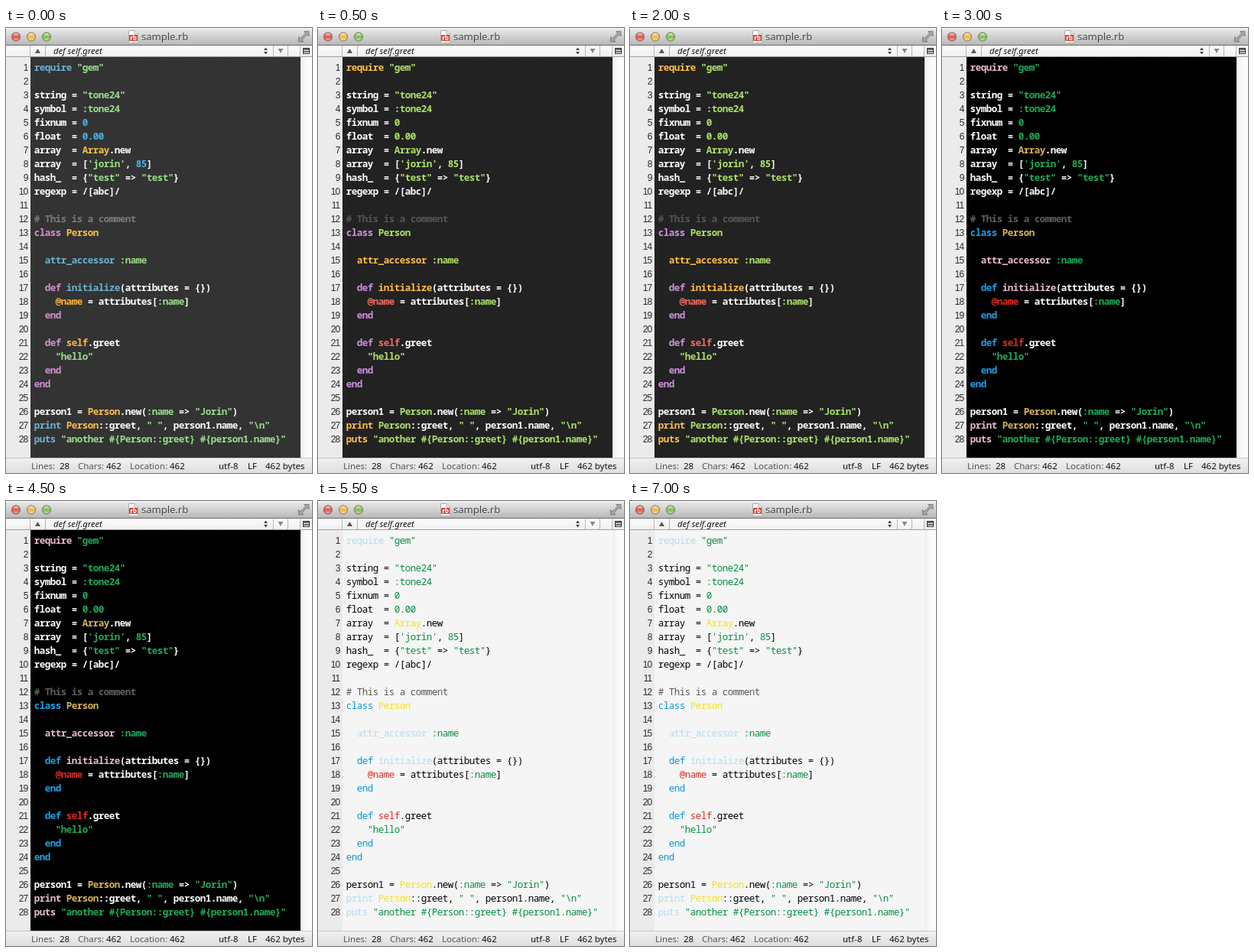
Recreate the animation shown at these times as an HTML page. Size 400x582 px, loop 8 s.

```html
<!DOCTYPE html>
<html lang="en">
<head>
<meta charset="utf-8">
<title>Editor themes</title>
<style>
  html, body { margin: 0; width: 100%; height: 100%; overflow: hidden; background: #fff; }
  svg { display: block; width: 100vw; height: 100vh; }
  text { white-space: pre; }
  .ui { font-family: "Noto Sans", "Open Sans", sans-serif; }
  .nums { font: 12px "Liberation Sans", Arial, sans-serif; letter-spacing: -.8px; fill: #2a2a2a; text-anchor: end; }
  #code { font-family: "Noto Sans Mono", "DejaVu Sans Mono", monospace; font-size: 12.5px; letter-spacing: -.5px; }
  .status { font-size: 11.5px; font-weight: 500; fill: #111; }
  .status .label { fill: #555; }
</style>
</head>
<body>
<svg viewBox="0 0 400 582" xmlns="http://www.w3.org/2000/svg">
  <defs>
    <linearGradient id="title" x2="0" y2="1"><stop stop-color="#ebebeb"/><stop offset="1" stop-color="#b6b6b6"/></linearGradient>
    <linearGradient id="nav" x2="0" y2="1"><stop stop-color="#fdfdfd"/><stop offset="1" stop-color="#eeeeee"/></linearGradient>
    <linearGradient id="foot" x2="0" y2="1"><stop stop-color="#f2f2f2"/><stop offset="1" stop-color="#dedede"/></linearGradient>
    <linearGradient id="track"><stop stop-color="#ededed"/><stop offset=".5" stop-color="#fafafa"/></linearGradient>
    <linearGradient id="gloss" x2="0" y2="1"><stop stop-color="#fff" stop-opacity=".75"/><stop offset=".5" stop-color="#fff" stop-opacity="0"/><stop offset="1" stop-color="#fff" stop-opacity=".5"/></linearGradient>
  </defs>

  <path d="M0 23V4Q0 0 4 0H396Q400 0 400 4V23Z" fill="url(#title)"/>
  <path d="M4 .5H396" stroke="#f8f8f8"/>
  <g id="lights"></g>
  <g>
    <path d="M160.500 3.500H168L172.500 8V19.500H160.500Z" fill="#fff" stroke="#aaa"/>
    <path d="M168 3.500V8H172.500" fill="#eee" stroke="#aaa"/>
    <rect x="161" y="9" width="11" height="8" rx="1" fill="#d9463c"/>
    <text class="ui" x="166.500" y="16" text-anchor="middle" font-size="8" font-weight="700" fill="#fff">rb</text>
  </g>
  <text class="ui" x="177" y="17" font-size="13" fill="#fff" opacity=".6">sample.rb</text>
  <text class="ui" x="177" y="16" font-size="13" fill="#444">sample.rb</text>
  <g fill="#a5a5a5" stroke="#6e6e6e" stroke-width=".8">
    <path d="M389.500 4.500H396V11L393.800 8.800L390.800 11.800L388.700 9.700L391.700 6.700Z"/>
    <path d="M389 18H382.500V11.500L384.700 13.700L387.700 10.700L389.800 12.800L386.800 15.800Z"/>
  </g>

  <rect y="23" width="400" height="15" fill="url(#nav)"/>
  <path d="M0 22.500H400" stroke="#6b6b6b"/>
  <path d="M0 37.500H400" stroke="#a0a0a0"/>
  <path d="M31.500 23V37M51.500 23V37M349.500 23V37M368.500 23V37M384.500 23V37" stroke="#b5b5b5"/>
  <path d="M38 33L41.500 27L45 33Z" fill="#555"/>
  <path d="M355.500 27H362.500L359 33Z" fill="#8a8a8a"/>
  <path d="M337 29L339.500 25.500L342 29ZM337 31L339.500 34.500L342 31Z" fill="#444"/>
  <text class="ui" x="62" y="34" font-size="11.200" font-weight="500" font-style="italic" fill="#111">def self.greet</text>
  <rect x="388.500" y="26.500" width="8" height="7" fill="#fff" stroke="#333"/>
  <path d="M389 28H396M389 31H396" stroke="#333" stroke-width="1.500"/>

  <rect y="38" width="32" height="524" fill="#ebebeb"/>
  <rect id="page" x="32" y="38" width="353" height="524"/>
  <rect x="385" y="38" width="15" height="524" fill="url(#track)"/>
  <g id="nums" class="nums"></g>
  <g id="code"></g>

  <rect y="562" width="400" height="20" fill="url(#foot)"/>
  <path d="M0 562.500H400" stroke="#c4c4c4"/>
  <g id="status" class="ui status"></g>
</svg>

<script>
const NS = "http://www.w3.org/2000/svg";
const $ = id => document.getElementById(id);
const LOOP = 8000, CHAR = 7, LEFT = 36.8, FIRST = 55.5, PITCH = 18;

function add(parent, tag, attrs, text) {
  const el = document.createElementNS(NS, tag);
  for (const key in attrs) el.setAttribute(key, attrs[key]);
  if (text !== undefined) el.textContent = text;
  parent.appendChild(el);
  return el;
}

const themes = [
  { from: 0, page: "#333333", weight: 600, text: "#ffffff", func: "#6ab4d4", str: "#98e08a",
    num: "#46b4ee", type: "#fdc04a", key: "#d88fd6", self: "#fdb73c", note: "#7b7b76" },
  { from: 500, page: "#222222", weight: 600, text: "#ffffff", func: "#ffbd45", str: "#aee268",
    num: "#aee268", type: "#aee268", key: "#d092e0", self: "#f86c64", note: "#555555" },
  { from: 3000, page: "#000000", weight: 600, text: "#ffffff", func: "#e8bbd0", str: "#1eab59",
    num: "#1eab59", type: "#d6b45c", key: "#1fa3e6", self: "#e62a21", note: "#625e5b" },
  { from: 5500, page: "#f5f5f5", weight: 500, text: "#000000", func: "#b0dcf4", str: "#078f45",
    num: "#078f45", type: "#f7e016", key: "#0a97dc", self: "#db2d20", note: "#5c5855" }
];

const source = `require "gem"

string = "tone24"
symbol = :tone24
fixnum = 0
float  = 0.00
array  = Array.new
array  = ['jorin', 85]
hash_  = {"test" => "test"}
regexp = /[abc]/

# This is a comment
class Person

  attr_accessor :name

  def initialize(attributes = {})
    @name = attributes[:name]
  end

  def self.greet
    "hello"
  end
end

person1 = Person.new(:name => "Jorin")
print Person::greet, " ", person1.name, "\\n"
puts "another #{Person::greet} #{person1.name}"`;

// Order matters: the first rule that fits names the token.
const rules = [
  ["note", /^#.*/],
  ["str", /^("[^"]*"|'[^']*')/],
  ["text", /^::/],
  ["str", /^:\w+/],
  ["key", /^(class|def|end)\b/],
  ["func", /^(require|attr_accessor|initialize|print|puts)\b/],
  ["self", /^(@\w+|self\b)/],
  ["type", /^[A-Z]\w*/],
  ["num", /^\d[\d.]*/],
  ["text", /^(\w+|[^\w\s"':@#]+|.)/]
];

const tokens = [];
source.split("\n").forEach((line, row) => {
  const y = FIRST + row * PITCH;
  add($("nums"), "text", { x: 28.5, y }, row + 1);
  let col = 0;
  while (col < line.length) {
    const rest = line.slice(col);
    const [kind, rule] = rules.find(r => r[1].test(rest));
    const part = rest.match(rule)[0];
    if (part.trim()) {
      const el = add($("code"), "text", { x: LEFT + col * CHAR, y }, part);
      tokens.push({ el, kind });
    }
    col += part.length;
  }
});

["#e0564e", "#eab64c", "#83bd50"].forEach((fill, i) => {
  const cx = 13 + i * 20;
  add($("lights"), "circle", { cx, cy: 11.5, r: 5.7, fill, stroke: "#777", "stroke-width": 0.9 });
  add($("lights"), "ellipse", { cx, cy: 11.5, rx: 4, ry: 4.8, fill: "url(#gloss)" });
});

[[33, "Lines:", 1], [70, "28"], [94, "Chars:", 1], [131, "462"], [162, "Location:", 1],
 [214, "462"], [278, "utf-8"], [316, "LF"], [339, "462 bytes"]].forEach(([x, text, label]) =>
  add($("status"), "text", { x, y: 577, class: label ? "label" : "value" }, text));

let shown = null;
function draw(time) {
  const t = time % LOOP;
  const theme = themes.filter(s => s.from <= t).pop();
  if (theme === shown) return;
  shown = theme;
  $("page").setAttribute("fill", theme.page);
  $("code").setAttribute("font-weight", theme.weight);
  for (const { el, kind } of tokens) el.setAttribute("fill", theme[kind]);
}

const start = performance.now();
function tick() {
  draw(performance.now() - start);
  requestAnimationFrame(tick);
}
draw(0);
requestAnimationFrame(tick);
</script>
</body>
</html>
```
